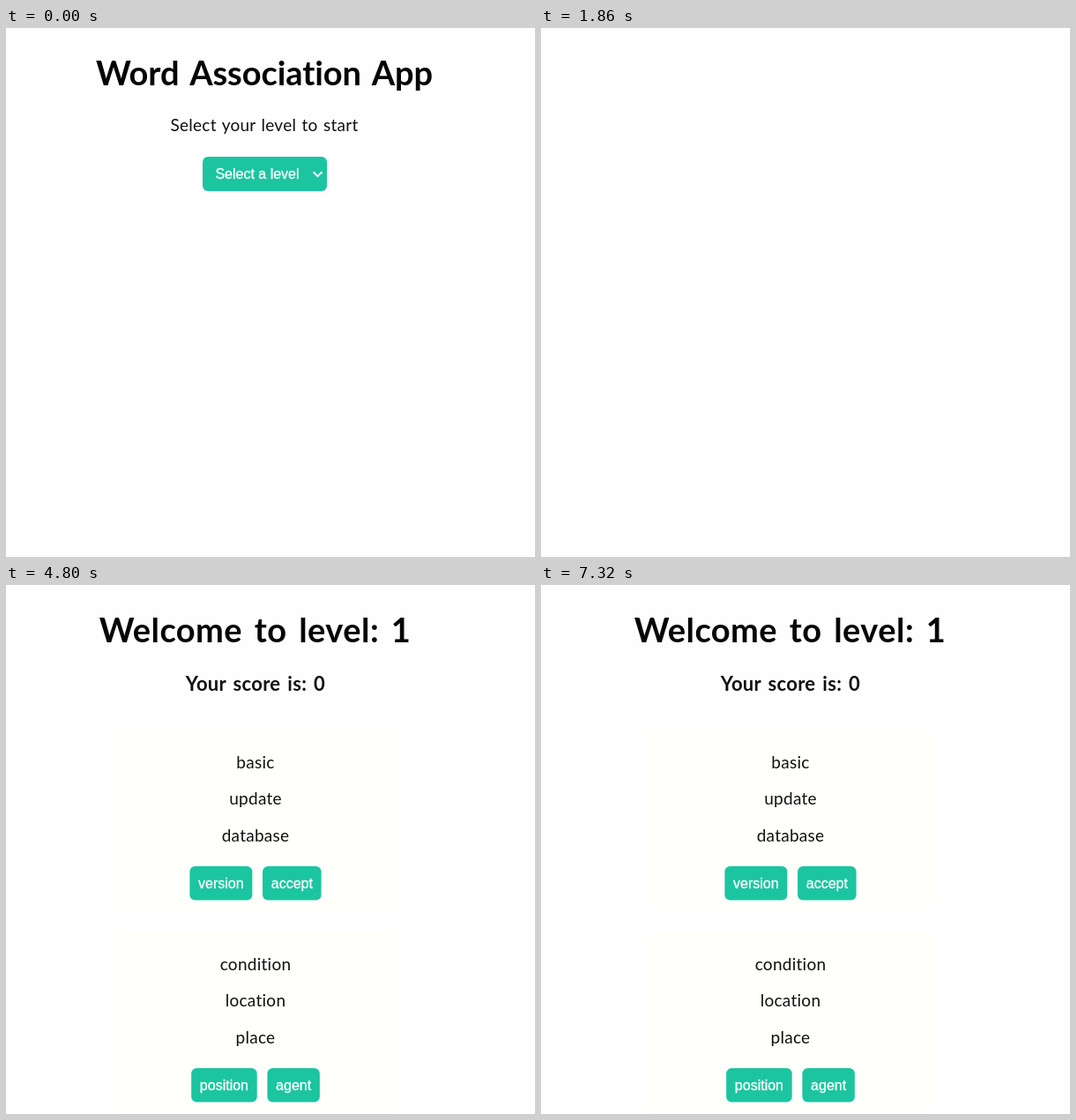
Write an HTML page that moves like this. It is 600 by 600 pixels and loops after 8 s.

```html
<!DOCTYPE html>
<html lang="en">
<head>
<meta charset="utf-8">
<title>Word Association App</title>
<style>
  html, body { margin: 0; width: 100%; height: 100%; overflow: hidden; background: #fffeff; }
  svg { display: block; width: 100%; height: 100%; }
  text { text-anchor: middle; font-family: Lato, "Open Sans", sans-serif; fill: #111; }
  .title { font-size: 38px; font-weight: 700; fill: #050505; word-spacing: 4px; }
  #start .title { letter-spacing: -.1px; }
  #level .title { letter-spacing: .45px; }
  .score { font-size: 22px; font-weight: 700; letter-spacing: .3px; word-spacing: 2.3px; }
  .body { font-size: 19px; letter-spacing: .27px; word-spacing: 1.2px; }
  .label { font: 16px "Liberation Sans", Arial, sans-serif; fill: #fff; stroke: #fff; stroke-width: .3px; }
  .button { fill: #1bc5a0; }
  .card { fill: #fffffb; }
</style>
</head>
<body>
<svg viewBox="0 0 600 600">
  <g id="start">
    <text class="title" x="293" y="65">Word Association App</text>
    <text class="body" x="293" y="117">Select your level to start</text>
    <rect class="button" x="223" y="146" width="141" height="39" rx="6"/>
    <text class="label" x="285" y="171">Select a level</text>
    <path d="M348.5 163.2l5 5l5-5" fill="none" stroke="#fff" stroke-width="2"/>
  </g>
  <g id="level">
    <text class="title" x="282.5" y="65">Welcome to level: 1</text>
    <text class="score" x="283" y="120">Your score is: 0</text>
  </g>
  <path id="cursor" d="M0 0V16.5L4 12.8L6.5 18.4L9 17.3L6.5 11.8H11.5Z"
    fill="#fff" stroke="#222" stroke-linejoin="round"/>
</svg>
<script>
const LOOP = 8000, STEP = 60;
const CENTER = 283, PADDING = 9.7, GAP = 11.7;
const [start, level, cursor] = ['start', 'level', 'cursor'].map(id => document.getElementById(id));

function add(tag, attrs, content = '') {
  const el = document.createElementNS('http://www.w3.org/2000/svg', tag);
  for (const key in attrs) el.setAttribute(key, attrs[key]);
  el.textContent = content;
  level.append(el);
  return el;
}

const write = (kind, x, y, content) => add('text', { class: kind, x, y }, content);
const box = (kind, x, y, width, height, rx) => add('rect', { class: kind, x, y, width, height, rx });

// Buttons take their width from the label and sit centred in a row.
function buttonRow(y, names) {
  const labels = names.map(name => write('label', 0, y + 24.5, name));
  const widths = labels.map(label => label.getComputedTextLength() + 2 * PADDING);
  const total = widths.reduce((sum, width) => sum + width + GAP, -GAP);
  let x = CENTER - total / 2;
  labels.forEach((label, i) => {
    box('button', x, y, widths[i], 38.5, 6);
    label.setAttribute('x', x + widths[i] / 2);
    level.append(label);
    x += widths[i] + GAP;
  });
}

function card(y, words, names) {
  box('card', 119, y, 329, 209, 10);
  words.forEach((word, i) => write('body', CENTER, y + 47 + i * 41.3, word));
  buttonRow(y + 158, names);
}

card(161, ['basic', 'update', 'database'], ['version', 'accept']);
card(390, ['condition', 'location', 'place'], ['position', 'agent']);

// Each glide runs in a straight line, then rests until the pointer hides.
const glide = (begin, end, hide, from, to) => ({ begin, end, hide, from, to });
const glides = [
  glide(780, 1020, 1200, [401, 420], [308, 166]),
  glide(1140, 1320, 1860, [308, 166], [310, 217]),
  glide(3840, 3960, 4020, [292, 325], [395, 540]),
  glide(4740, 4800, 4800, [394, 580], [394, 600]),
  glide(6360, 6600, 6660, [342, 566], [239, 95])
];

const show = (el, on) => { el.style.visibility = on ? 'visible' : 'hidden'; };

function draw(t) {
  show(start, t < 1380);
  show(level, t >= 2160);
  const now = Math.floor(t / STEP) * STEP;
  const move = glides.findLast(g => now >= g.begin && now < g.hide);
  show(cursor, move);
  if (!move) return;
  const p = Math.min(1, (now - move.begin) / (move.end - move.begin));
  const at = move.from.map((a, i) => a + (move.to[i] - a) * p);
  cursor.setAttribute('transform', `translate(${at})`);
}

const origin = performance.now();
function tick() {
  draw((performance.now() - origin) % LOOP);
  requestAnimationFrame(tick);
}
tick();
</script>
</body>
</html>
```
